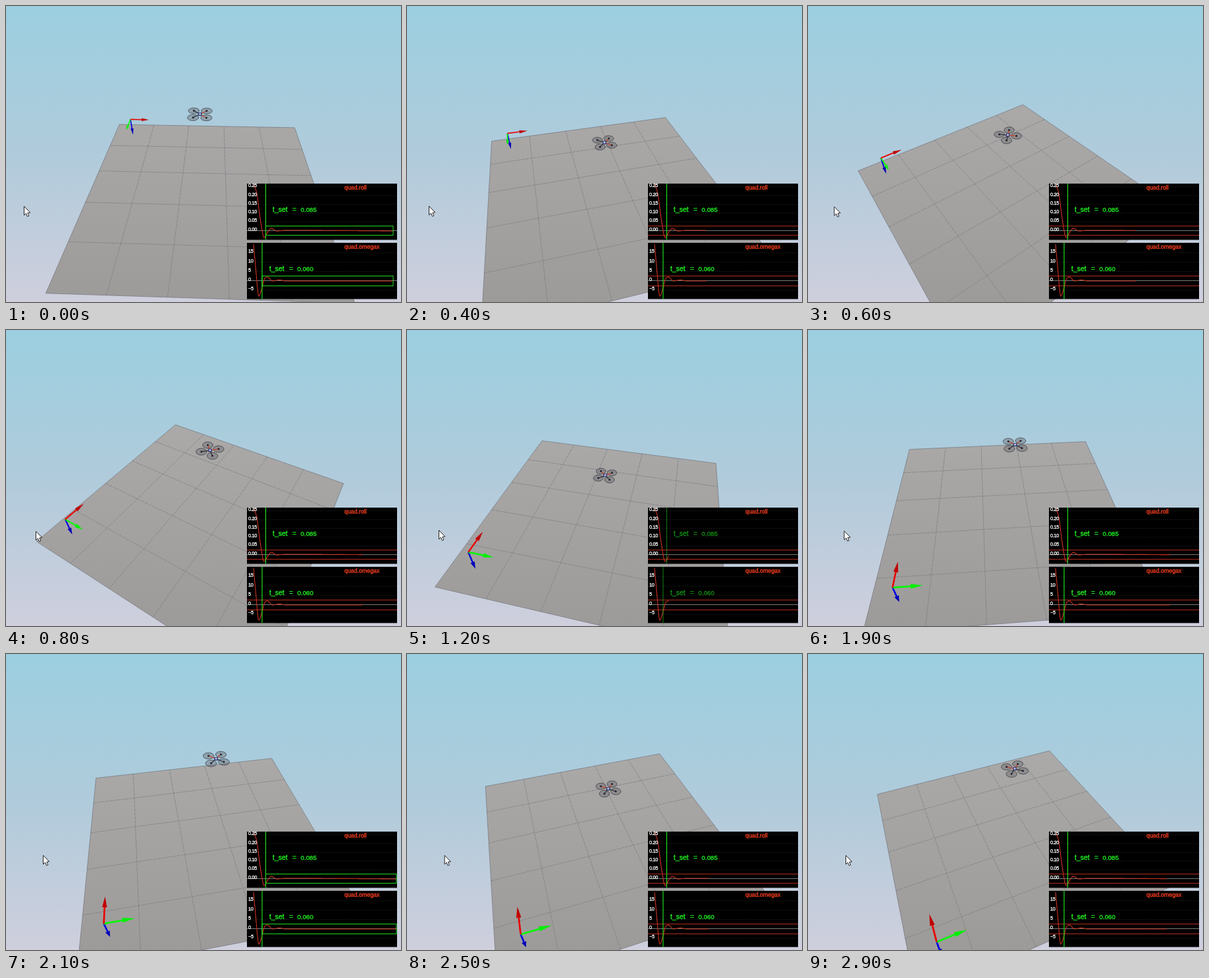
Animation of 600 by 450 pixels, one loop 3 s. Source, as an HTML page with a canvas:

```html
<!DOCTYPE html>
<html>
<head>
<meta charset="utf-8">
<style>
  html, body { margin: 0; width: 100%; height: 100%; overflow: hidden; }
  canvas { display: block; }
</style>
</head>
<body>
<canvas id="stage" width="600" height="450"></canvas>
<script>
const ctx = document.getElementById('stage').getContext('2d');
const LOOP = 3000, STEP = 100, FOCAL = 478.5, DISTANCE = 1.284, TARGET = 0.197;
const FONT = '"Liberation Sans", Arial, sans-serif';

// Camera drag: time, yaw, pitch (degrees), pointer x
const POSES = [
  [0, -1.9, 38.8, 27], [400, 14, 38, 33], [800, 59, 43.1, 45], [1200, 76.8, 38.7, 48],
  [1600, 83.9, 39, 51], [2100, 100.6, 43.2, 56], [2900, 113, 43.5, 57]
];
const PLOTS = [
  {
    title: 'quad.roll', top: 270, zero: 341.5, band: [334.5, 348.5], settleX: 394.5, label: '0.085', labelX: 405,
    ticks: ['0.25', '0.20', '0.15', '0.10', '0.05', '0.00'], tickTop: 273, tickGap: 13.3,
    points: [[376, 270], [380.5, 283], [386.5, 326], [392, 352], [398, 343], [403, 338], [411, 342], [425, 341], [594, 342]]
  },
  {
    title: 'quad.omegax', top: 360, zero: 417.5, band: [410.5, 425.5], settleX: 389, label: '0.060', labelX: 400,
    ticks: ['15', '10', '5', '0', '−5'], tickTop: 373, tickGap: 14.3,
    points: [[376, 362], [379, 395], [384, 441], [389, 428], [393, 414], [397, 412], [405, 418], [415, 416.5], [425, 418], [594, 418]]
  }
];

// Monotone cubic through rows [x, ...values]
function curve(rows, x, col = 1) {
  const last = rows.length - 1;
  x = Math.max(rows[0][0], Math.min(rows[last][0], x));
  let i = 0;
  while (i < last - 1 && x > rows[i + 1][0]) i++;
  const slope = k => (rows[k + 1][col] - rows[k][col]) / (rows[k + 1][0] - rows[k][0]);
  const tangent = k => {
    if (k === 0) return slope(0);
    if (k === last) return slope(last - 1);
    const a = slope(k - 1), b = slope(k);
    return a * b > 0 ? 2 * a * b / (a + b) : 0;
  };
  const w = rows[i + 1][0] - rows[i][0], s = (x - rows[i][0]) / w;
  return rows[i][col] * (1 + 2 * s) * (1 - s) ** 2 + w * tangent(i) * s * (1 - s) ** 2
    + rows[i + 1][col] * s * s * (3 - 2 * s) + w * tangent(i + 1) * s * s * (s - 1);
}

// World: r and g run along the red and green axes from the floor centre, h is height
function makeCamera(yaw, pitch) {
  const cy = Math.cos(yaw), sy = Math.sin(yaw), cp = Math.cos(pitch), sp = Math.sin(pitch);
  return (r, g, h = 0) => {
    const ahead = r * sy - g * cy, up = h - TARGET;
    const k = FOCAL / (DISTANCE + ahead * cp - up * sp);
    return [300 + (r * cy + g * sy) * k, 225 - (up * cp + ahead * sp) * k, k];
  };
}

function path(points, close) {
  ctx.beginPath();
  points.forEach(p => ctx.lineTo(p[0], p[1]));
  if (close) ctx.closePath();
}

function line(points, color, width = 1) {
  path(points);
  ctx.strokeStyle = color;
  ctx.lineWidth = width;
  ctx.stroke();
}

function shade(...stops) {
  const g = ctx.createLinearGradient(0, 0, 0, 450);
  stops.forEach(([at, color]) => g.addColorStop(at, color));
  return g;
}

// A hairline outline gives the slightly heavy plot lettering
function text(str, x, y, size, color) {
  ctx.font = `${size}px ${FONT}`;
  ctx.fillStyle = ctx.strokeStyle = color;
  ctx.lineWidth = .3;
  ctx.fillText(str, x, y);
  ctx.strokeText(str, x, y);
}

const SKY = shade([0, '#9bcfe0'], [0.5, '#b0cbdb'], [1, '#cfcfdd']);
const FLOOR = shade([0.3, '#abaaa9'], [1, '#9d9b9a']);

function drawFloor(cam) {
  path([cam(-.5, -.5), cam(.5, -.5), cam(.5, .5), cam(-.5, .5)], true);
  ctx.fillStyle = FLOOR;
  ctx.fill();
  ctx.strokeStyle = 'rgba(100,98,104,.7)';
  ctx.lineWidth = 0.8;
  ctx.stroke();
  ctx.setLineDash([5, 1]);
  for (let v = -.3; v < .4; v += .2) {
    line([cam(v, -.5), cam(v, .5)], 'rgba(112,110,118,.6)', 0.9);
    line([cam(-.5, v), cam(.5, v)], 'rgba(112,110,118,.6)', 0.9);
  }
  ctx.setLineDash([]);
}

function drawArrow(from, to, shaft, head) {
  const dx = to[0] - from[0], dy = to[1] - from[1], len = Math.hypot(dx, dy);
  const neck = [from[0] + dx * .6, from[1] + dy * .6];
  const half = from[2] * .0078, nx = -dy / len * half, ny = dx / len * half;
  line([from, neck], shaft, from[2] * .0055);
  path([[neck[0] + nx, neck[1] + ny], to, [neck[0] - nx, neck[1] - ny]], true);
  ctx.fillStyle = head;
  ctx.fill();
}

function drawAxes(cam) {
  const o = -.4, h = .1, len = .098, from = cam(o, o, h);
  drawArrow(from, cam(o, o, h - len), '#0000e0', '#0000b8');
  drawArrow(from, cam(o, o + len, h), '#00fa00', '#00f000');
  drawArrow(from, cam(o + len, o, h), '#ea0000', '#c00000');
}

function drawDrone(cam, progress) {
  const rise = progress ** 1.18, arm = .0232, radius = .0195;
  const at = (r, g) => cam(-.011 * rise + r, .044 * rise + g, TARGET + .216 * rise);
  const body = at(0, 0);
  for (const r of [arm, -arm]) for (const g of [-arm, arm]) {
    const rim = [];
    for (let a = 0; a < 6.28; a += .3) rim.push(at(r + radius * Math.cos(a), g + radius * Math.sin(a)));
    path(rim, true);
    ctx.fillStyle = 'rgba(100,100,108,.4)';
    ctx.fill();
    ctx.strokeStyle = 'rgba(45,45,50,.85)';
    ctx.lineWidth = .8;
    ctx.stroke();
    const hub = at(r, g);
    line([body, hub], r > 0 ? '#c8452c' : '#34343c', 1.3);
    ctx.fillStyle = '#22222c';
    ctx.fillRect(hub[0] - 1.3, hub[1] - 1.3, 2.6, 2.6);
  }
  ctx.fillStyle = '#3a3f70';
  ctx.fillRect(body[0] - 3, body[1] - 2.5, 6, 5);
  ctx.fillStyle = '#b9c2ee';
  ctx.fillRect(body[0] - 1.5, body[1] - 1.5, 3, 2.5);
}

function drawPlot(plot, end, done) {
  const { top, band, settleX, points } = plot;
  ctx.save();
  ctx.beginPath();
  ctx.rect(366, top, 228, 85.5);
  ctx.clip();
  ctx.fillStyle = '#000';
  ctx.fillRect(366, top, 228, 86);
  ctx.setLineDash([1, 2]);
  plot.ticks.forEach((_, i) => {
    const y = plot.tickTop + 2 + i * plot.tickGap;
    line([[366, y], [594, y]], '#2c2c2c');
  });
  ctx.setLineDash([]);
  line([[366, plot.zero], [594, plot.zero]], '#777');
  if (!done) band.forEach(y => line([[366, y], [594, y]], '#b02c1c'));

  const trace = [];
  for (let x = 376; x <= end; x += .5) trace.push([x, curve(points, x)]);
  line(trace, '#cc3320', 1.1);

  ctx.globalAlpha = end < 400 ? .5 : 1;
  line([[settleX, top], [settleX, top + 86]], '#1fdc1f', 1.2);
  if (done) {
    ctx.lineWidth = 1;
    ctx.strokeRect(settleX, band[0], end - settleX, band[1] - band[0]);
  }
  const x = plot.labelX, y = top + 43.3;
  text('t_set', x, y, 10.5, '#22ff22');
  text('=', x + 30, y, 10.5, '#22ff22');
  text(plot.label, x + 42.5, y, 9.8, '#22ff22');
  ctx.globalAlpha = 1;

  text(plot.title, 514, top + 8.5, 8.8, '#ff4020');
  ctx.letterSpacing = '-0.3px';
  plot.ticks.forEach((tick, i) => text(tick, 368, plot.tickTop + 2.2 + i * plot.tickGap, 7.4, '#fff'));
  ctx.restore();
}

function drawPointer(x, y) {
  path([[0, 0], [0, 13.5], [3, 10.8], [5, 15.5], [7.3, 14.5], [5.4, 10], [9.3, 9.6]].map(p => [x + p[0], y + p[1]]), true);
  ctx.fillStyle = '#fff';
  ctx.fill();
  ctx.strokeStyle = '#222';
  ctx.lineWidth = 1;
  ctx.stroke();
}

function draw(t) {
  const yaw = curve(POSES, t, 1), pitch = curve(POSES, t, 2);
  const cam = makeCamera(yaw * Math.PI / 180, pitch * Math.PI / 180);
  const start = t > 2100 ? 2121 : t > 1100 ? 1100 : t > 0 ? 36 : -977;
  const run = .217 * (t - start), done = run >= 211;
  ctx.fillStyle = SKY;
  ctx.fillRect(0, 0, 600, 450);
  drawFloor(cam);
  drawAxes(cam);
  drawDrone(cam, Math.min(1, run / 212));
  PLOTS.forEach(plot => drawPlot(plot, Math.min(593.5, 376 + run), done));
  drawPointer(curve(POSES, t, 3) + .5, 304.5 + (pitch - 38.8) * .35);
}

function tick() {
  draw(Math.floor(performance.now() % LOOP / STEP) * STEP);
  requestAnimationFrame(tick);
}
tick();
</script>
</body>
</html>
```
